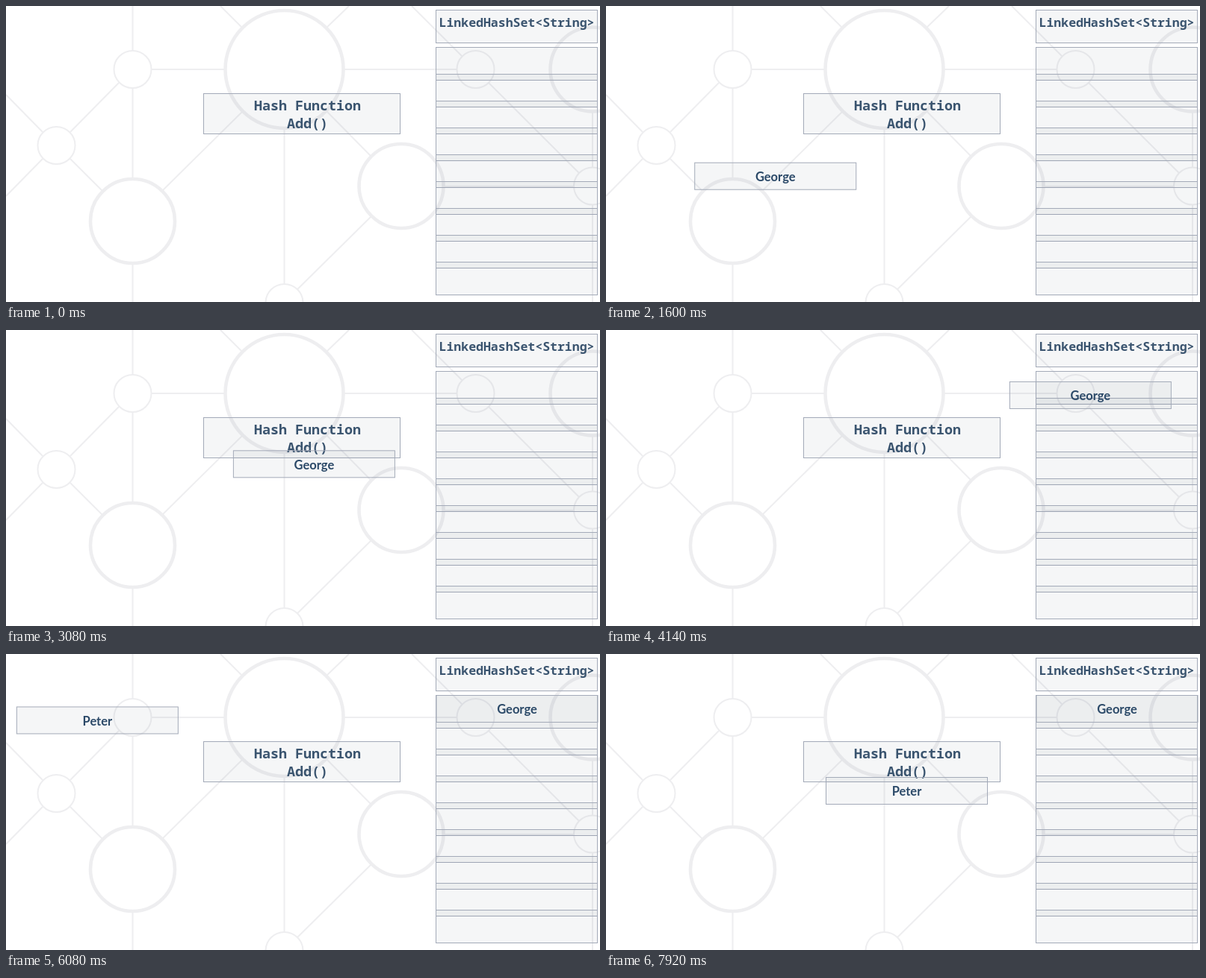
Write an HTML page that moves like this. It is 795 px wide and 397 px high and loops after 8000 ms.

```html
<!DOCTYPE html>
<html lang="en">
<head>
<meta charset="utf-8">
<title>Linked hash set</title>
<style>
  html, body { margin: 0; width: 100%; height: 100%; overflow: hidden; background: #fff; }
  svg { display: block; width: 100vw; height: 100vh; }
  text { text-anchor: middle; font-weight: 700; }
  .net { fill: none; stroke: #eeeef0; stroke-width: 2; }
  .net .big { stroke-width: 4.6; }
  .box { fill: #44546a; fill-opacity: .05; stroke: #a3aab8; stroke-width: 1; }
  .mono { font-family: "Noto Sans Mono", "DejaVu Sans Mono", monospace; fill: #3a546f; }
  .item { font: 700 16.5px Lato, "Open Sans", sans-serif; fill: #2b4968; }
</style>
</head>
<body>
<svg viewBox="0 0 795 397" preserveAspectRatio="none">
  <g class="net">
    <path d="M169.5 0V60M169.5 110V231M169.5 346V397M195 85H292M453 85H603
      M0 119L49 169M49 205L0 255M86 169L151 103M86 205L130 249M208 249L317 141
      M372.5 166V373M429 141L489 202M390 380L489 282M287 0L317 30M428 30L459 0
      M543 0L610 67M646 103L767 224M587 242H760M785 143V216M785 267V397"/>
    <g id="nodes"></g>
  </g>
  <g id="boxes"></g>
  <g class="mono">
    <text x="403.5" y="140" font-size="18.33">Hash Function</text>
    <text x="403.5" y="164" font-size="18.33">Add()</text>
    <text x="683.5" y="28" font-size="16.5">LinkedHashSet&lt;String&gt;</text>
  </g>
  <g id="items"></g>
</svg>
<script>
const LOOP = 8000, FIRST = 290, STEP = 77, FADE = 500, MOVE = 2000;

const $ = id => document.getElementById(id);

function add(parent, tag, attrs, text) {
  const el = document.createElementNS(parent.namespaceURI, tag);
  for (const key in attrs) el.setAttribute(key, attrs[key]);
  if (text) el.textContent = text;
  parent.appendChild(el);
  return el;
}

function addBox(parent, x, y, width, height) {
  add(parent, 'rect', { class: 'box', x, y, width, height });
}

// Background network: centre and radius
[[372.5, 85, 79], [169.5, 85, 25], [67.5, 187, 25], [169.5, 288.5, 56.5],
 [529, 241.5, 56.5], [372.5, 398, 25], [628.5, 85, 25], [785, 85, 56.5], [785, 241.5, 25]]
  .forEach(([cx, cy, r]) => add($('nodes'), 'circle', { cx, cy, r, class: r > 30 ? 'big' : '' }));

addBox($('boxes'), 264.5, 117.5, 263, 54);
addBox($('boxes'), 575.5, 5.5, 216, 44);
for (let i = 0; i < 9; i++) addBox($('boxes'), 575.5, 55.5 + 36 * i, 216, 36 + 8 * (i < 8));
// The last row is as tall as the others; its top overlaps the row above.
$('boxes').lastChild.setAttribute('height', 44);
$('boxes').lastChild.setAttribute('y', 343.5);

const items = [
  { name: 'George', start: 225, path: [[13, 237], [294.5, 165.7], [576, 55.5]], moves: [725, 2705] },
  { name: 'Peter', start: 5384, path: [[13, 70.5], [294.5, 165.5]], moves: [5884] }
];

for (const item of items) {
  item.el = add($('items'), 'g', { opacity: 0 });
  addBox(item.el, 0, 0, 216, 36);
  add(item.el, 'text', { class: 'item', x: 108, y: 24.7 }, item.name);
}

const clamp = u => Math.min(1, Math.max(0, u));
const ease = u => u - Math.sin(2 * Math.PI * u) / (2 * Math.PI);

function position({ path, moves }, t) {
  let [x, y] = path[0];
  moves.forEach((start, i) => {
    const p = ease(clamp((t - start) / MOVE));
    x += (path[i + 1][0] - path[i][0]) * p;
    y += (path[i + 1][1] - path[i][1]) * p;
  });
  return [x, y];
}

function render(time) {
  // Motion advances in steps of about 1/13 s
  const t = time < FIRST ? 0 : FIRST + Math.floor((time - FIRST) / STEP) * STEP;
  for (const item of items) {
    const [x, y] = position(item, t);
    item.el.setAttribute('transform', `translate(${x.toFixed(2)} ${y.toFixed(2)})`);
    item.el.setAttribute('opacity', clamp((t - item.start) / FADE).toFixed(3));
  }
}

const begin = performance.now();
function tick() {
  render((performance.now() - begin) % LOOP);
  requestAnimationFrame(tick);
}
tick();
</script>
</body>
</html>
```
